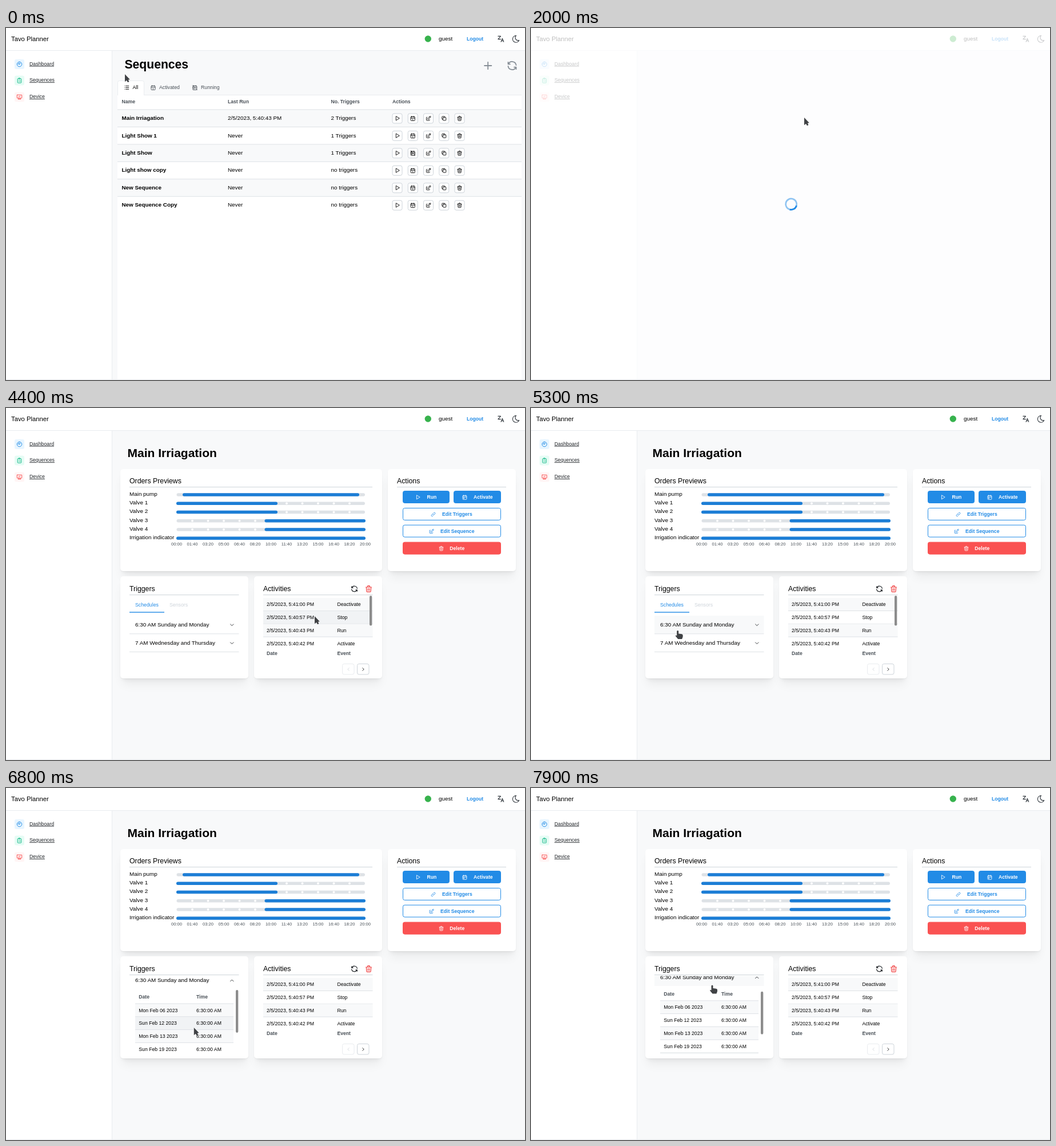
These frames come from a looping animation (908 px wide and 617 px high, 8000 ms). An HTML page:

```html
<!DOCTYPE html>
<html lang="en">
<head>
<meta charset="utf-8">
<title>Watering scheduler</title>
<style>
html, body { margin: 0; width: 100%; height: 100%; overflow: hidden; background: #fff; }
svg { display: block; width: 908px; height: 617px; font-family: "Liberation Sans", Arial, sans-serif; }
text { white-space: pre; }
.card { width: 100%; height: 100%; background: #fff; border-radius: 5px;
  box-shadow: 0 1px 2px rgba(0,0,0,.05), 0 14px 18px -4px rgba(0,0,0,.06), 0 7px 7px -4px rgba(0,0,0,.05); }
</style>
</head>
<body>
<svg id="stage" viewBox="0 0 908 617">
  <defs><clipPath id="scrollArea"><rect x="214" y="329.5" width="195" height="137"/></clipPath></defs>
  <g id="shell"></g>
  <g id="list"></g>
  <g id="detail"></g>
  <g id="activities"></g>
  <g id="triggers" clip-path="url(#scrollArea)"></g>
  <g id="loader"></g>
  <g id="cursor"></g>
</svg>
<script>
const LOOP = 8000, STEP = 100;
const BLUE = '#228be6', LINE = '#dee2e6', STRIPE = '#f8f9fa', HOVER = '#f1f3f5', GRAY = '#495057';
const CALENDAR = 'M6 5h12a2 2 0 0 1 2 2v12a2 2 0 0 1-2 2H6a2 2 0 0 1-2-2V7a2 2 0 0 1 2-2zM16 3v4M8 3v4M4 11h16';
const ICONS = {
  play: 'M7 4v16l13-8z',
  calendar: CALENDAR + 'M11 15h1v3',
  event: CALENDAR + 'M8 15h2v2H8z',
  calendarOff: CALENDAR + 'M3 3l18 18M8 15h2v2H8z',
  edit: 'M7 7H6a2 2 0 0 0-2 2v9a2 2 0 0 0 2 2h9a2 2 0 0 0 2-2v-1M20.4 6.6a2.1 2.1 0 0 0-3-3L9 12v3h3zM16 5l3 3',
  copy: 'M10 8h8a2 2 0 0 1 2 2v8a2 2 0 0 1-2 2h-8a2 2 0 0 1-2-2v-8a2 2 0 0 1 2-2zM16 8V6a2 2 0 0 0-2-2H6a2 2 0 0 0-2 2v8a2 2 0 0 0 2 2h2',
  trash: 'M4 7h16M10 11v6M14 11v6M5 7l1 12a2 2 0 0 0 2 2h8a2 2 0 0 0 2-2l1-12M9 7V4a1 1 0 0 1 1-1h4a1 1 0 0 1 1 1v3',
  list: 'M9 6h11M9 12h11M9 18h11M5 6v.01M5 12v.01M5 18v.01',
  refresh: 'M20 11A8.1 8.1 0 0 0 4.5 9M4 5v4h4M4 13a8.1 8.1 0 0 0 15.5 2M20 19v-4h-4',
  plus: 'M12 5v14M5 12h14',
  moon: 'M12 3h.4a7.5 7.5 0 0 0 7.9 12.4A9 9 0 1 1 12 3z',
  translate: 'M4 4h8l-8 9h8M13 21l4-10 4 10M14.5 18h5',
  link: 'M10 14a3.5 3.5 0 0 0 5 0l4-4a3.5 3.5 0 0 0-5-5l-.5.5M14 10a3.5 3.5 0 0 0-5 0l-4 4a3.5 3.5 0 0 0 5 5l.5-.5',
  chevron: 'M6 9l6 6 6-6',
  gauge: 'M12 3a9 9 0 1 1 0 18a9 9 0 1 1 0-18M11 12a1 1 0 1 0 2 0a1 1 0 1 0-2 0M13.4 10.6L16 8M7 12a5 5 0 0 1 5-5',
  clipboard: 'M9 5H7a2 2 0 0 0-2 2v12a2 2 0 0 0 2 2h10a2 2 0 0 0 2-2V7a2 2 0 0 0-2-2h-2M11 3h2a2 2 0 0 1 0 4h-2a2 2 0 0 1 0-4zM9 12h.01M13 12h2M9 16h.01M13 16h2',
  desktop: 'M4 4h16a1 1 0 0 1 1 1v10a1 1 0 0 1-1 1H4a1 1 0 0 1-1-1V5a1 1 0 0 1 1-1zM7 20h10M9 16v4M15 16v4M8 12l3-3 2 2 3-3'
};

const $ = id => document.getElementById(id);
const clamp01 = v => Math.min(1, Math.max(0, v));
const rect = (x, y, w, h, fill, extra = '') =>
  `<rect x="${x}" y="${y}" width="${w}" height="${h}" fill="${fill}" ${extra}/>`;
const box = (x, y, w, h, stroke, fill = '#fff') => rect(x, y, w, h, fill, `rx="3" stroke="${stroke}"`);
const hline = (x1, x2, y, color = LINE) => rect(x1, y - .5, x2 - x1, 1, color);
// y is the middle of the capital letters
const text = (x, y, str, size = 9.87, fill = '#000', extra = '') =>
  `<text x="${x}" y="${y + size * .36}" font-size="${size}" fill="${fill}" ${extra}>${str}</text>`;
const bold = (x, y, str, size = 8.65, fill = GRAY) => text(x, y, str, size, fill, 'font-weight="700"');
const icon = (name, x, y, scale = .47, color = '#000', angle = 0, width = 2) =>
  `<path d="${ICONS[name]}" transform="translate(${x} ${y}) rotate(${angle}) scale(${scale}) translate(-12 -12)"
    fill="none" stroke="${color}" stroke-width="${width}" stroke-linecap="round" stroke-linejoin="round"/>`;
const card = (x, y, w) =>
  `<foreignObject x="${x}" y="${y}" width="${w}" height="178.5" overflow="visible"><div class="card"></div></foreignObject>`;

function drawShell() {
  const link = (y, label, name, color, tint, underline) =>
    rect(15, y - 8, 17, 17, tint, 'rx="3"') + icon(name, 23.5, y + .5, .47, color) +
    text(41, y - .5, label, 8.8, '#212529', `style="text-decoration:underline ${underline}"`);
  return rect(0, 0, 908, 617, '#fff') + rect(185, 39, 723, 578, '#f8f9fa') +
    hline(0, 908, 39.5, '#e9ecef') + rect(185, 39, 1, 578, '#e9ecef') +
    text(9, 18.5, 'Tavo Planner', 11.28) +
    '<circle cx="738.3" cy="19" r="5.7" fill="#37b24d"/>' +
    text(757, 18.8, 'guest') + bold(806, 18.5, 'Logout', 8.65, BLUE) +
    icon('translate', 865.5, 19, .58, '#343a40') + icon('moon', 892.3, 19.3, .65, '#343a40', 0, 1.8) +
    link(63, 'Dashboard', 'gauge', BLUE, '#e7f5ff', '#000') +
    link(91.5, 'Sequences', 'clipboard', '#12b886', '#e6fcf5', '#551a8b') +
    link(120.5, 'Device', 'desktop', '#fa5252', '#fff5f5', '#551a8b');
}

function drawList() {
  const rows = [
    ['Main Irriagation', '2/5/2023, 5:40:43 PM', '2 Triggers'],
    ['Light Show 1', 'Never', '1 Triggers'],
    ['Light Show', 'Never', '1 Triggers'],
    ['Light show copy', 'Never', 'no triggers'],
    ['New Sequence', 'Never', 'no triggers'],
    ['New Sequence Copy', 'Never', 'no triggers']
  ];
  let out = bold(207.5, 63.5, 'Sequences', 21.15, '#000') +
    icon('plus', 843.2, 66, .88, '#868e96') + icon('refresh', 885.5, 66, .88, '#868e96') +
    rect(195, 117, 707, 500, '#fff') +
    '<path d="M195.5 118V95.5q0-3 3-3h40q3 0 3 3V118" fill="#fff" stroke="#e9ecef"/>' +
    hline(242, 902, 117.5, '#e9ecef') +
    icon('list', 211, 104.5) + text(221.5, 104, 'All', 8.75) +
    icon('calendar', 257.5, 104.5, .44, GRAY) + text(268, 104, 'Activated', 8.75, GRAY) +
    icon('calendarOff', 330.3, 104.5, .44, GRAY) + text(341, 104, 'Running', 8.75, GRAY) +
    bold(202.5, 128.5, 'Name') + bold(388, 128.5, 'Last Run') +
    bold(568.5, 128.5, 'No. Triggers') + bold(676, 128.5, 'Actions');
  rows.forEach(([name, last, triggers], i) => {
    const y = 157.5 + 30.45 * i, top = 143 + 30.45 * i;
    if (i % 2 === 0) out += rect(195, top, 707, 30.45, STRIPE);
    out += hline(195, 902, top) + bold(202.5, y, name, 9.87, '#000') +
      text(388, y, last) + text(568.5, y, triggers);
    ['play', i === 2 ? 'calendarOff' : 'calendar', 'edit', 'copy', 'trash'].forEach((name, k) => {
      const x = 684.5 + 27.25 * k;
      out += box(x - 8.5, y - 7.5, 17, 17, '#ced4da') + icon(name, x, y + 1, .44);
    });
  });
  return out;
}

function drawDetail() {
  const title = (x, y, str, right) => text(x, y, str, 12.3) + hline(x, right, y + 11.3, '#ced4da');
  const button = (x, y, w, label, labelX, name, iconX, fill, color = '#fff') =>
    box(x + .5, y + .5, w - 1, 21, color === '#fff' ? fill : color, fill) +
    icon(name, iconX, y + 11.5, .42, color) + bold(labelX, y + 10.7, label, 8.65, color);
  let out = bold(212.5, 78.5, 'Main Irriagation', 21, '#000') +
    card(200, 107, 458) + card(668, 107, 224) + card(200, 295, 224) + card(434, 295, 224) +
    title(216, 127.3, 'Orders Previews', 641) + title(684, 127.3, 'Actions', 875) +
    title(216, 316.3, 'Triggers', 407.5) + title(450, 316.3, 'Activities', 641.5);

  const tickX = i => 298.5 + 27.5 * i;
  [['Main pump', 309, 618], ['Valve 1', 298, 475], ['Valve 2', 298, 475],
   ['Valve 3', 452.5, 629], ['Valve 4', 452.5, 629], ['Irrigation indicator', 298, 629]
  ].forEach(([label, from, to], i) => {
    const y = 152 + 15.25 * i;
    out += text(216, y - 1.7, label) + rect(298.5, y - 2.7, 329.5, 5.4, LINE, 'rx="2.7"');
    for (let k = 1; k < 12; k++)
      if (i && (tickX(k) < from || tickX(k) > to))
        out += `<circle cx="${tickX(k)}" cy="${y}" r="1.9" fill="#fff"/>`;
    out += rect(from, y - 2.7, to - from, 5.4, '#1c7ed6', 'rx="2.7"');
  });
  for (let k = 0; k <= 12; k++) {
    const minutes = 100 * k, pad = n => String(n).padStart(2, '0');
    out += text(tickX(k), 238, pad(Math.floor(minutes / 60)) + ':' + pad(minutes % 60), 7.6, GRAY, 'text-anchor="middle"');
  }

  return out +
    button(694, 145, 82, 'Run', 736.5, 'play', 720.5, BLUE) +
    button(783, 145, 83, 'Activate', 818, 'event', 802.5, BLUE) +
    button(694, 175, 172, 'Edit Triggers', 763, 'link', 747.5, '#fff', BLUE) +
    button(694, 204.7, 172, 'Edit Sequence', 760, 'edit', 744.5, '#fff', BLUE) +
    button(694, 234.7, 172, 'Delete', 776.3, 'trash', 761.5, '#fa5252') +
    icon('refresh', 609.5, 317, .6, '#212529') + icon('trash', 634.5, 317, .6, '#f03e3e') +
    box(588.5, 448.5, 20.5, 18.5, '#e9ecef') + icon('chevron', 599, 458, .4, '#ced4da', 90) +
    box(614.5, 448.5, 20.5, 18.5, '#ced4da') + icon('chevron', 625, 458, .4, '#000', -90);
}

function drawActivities(t, mouse) {
  const rows = [['41:00', 'Deactivate'], ['40:57', 'Stop'], ['40:43', 'Run'], ['40:42', 'Activate']];
  let out = '';
  rows.forEach(([time, event], i) => {
    const y = 344 + 22.8 * i, height = i < 3 ? 22.8 : 17;
    const hovered = mouse.x > 450 && mouse.x < 641 && mouse.y >= y - 11.4 && mouse.y < y - 11.4 + height;
    if (hovered || i % 2 === 0) out += rect(450, y - 11, 191.5, height, hovered ? HOVER : STRIPE);
    if (i < 3) out += hline(450, 641.5, y + 11.5);
    out += text(456, y, `2/5/2023, 5:${time} PM`, 8.68) + text(579.5, y, event, 8.68);
  });
  out += bold(456, 430, 'Date') + bold(579.5, 430, 'Event');
  if (t >= 4000 && t < 5700) out += rect(636, 329, 4.3, 52.5, '#8c8c8c', 'rx="2.1"');
  return out;
}

const MAX_SCROLL = 107;
const scrollAt = t => MAX_SCROLL * clamp01((t - 6600) / 500) - 59 * clamp01((t - 7300) / 600);

function drawTriggers(t, mouse) {
  const open = t >= 6100, scroll = scrollAt(t);
  const over = (y, half) => mouse.x > 216 && mouse.x < 407 && mouse.y > 329 && mouse.y < 466 && Math.abs(mouse.y - y) <= half;
  const control = (y, label, angle) => {
    const hovered = over(y, 15.5);
    mouse.hand = mouse.hand || hovered;
    return (hovered ? rect(216, y - 15.2, 191.5, 31, STRIPE) : '') +
      text(226, y - .2, label) + icon('chevron', 395.3, y + 1, .45, '#212529', angle);
  };
  let out = text(226, 344.7 - scroll, 'Schedules', 8.78, BLUE) + text(286, 344.7 - scroll, 'Sensors', 8.78, '#ced4da') +
    rect(216, 357.3 - scroll, 61, 1.4, BLUE) +
    control(379.3 - scroll, '6:30 AM Sunday and Monday', t < 6100 ? 0 : t < 6200 ? 135 : 180);
  if (!open)
    return out + hline(216, 407.5, 395.8) + control(411.2, '7 AM Wednesday and Thursday', 0) + hline(216, 407.5, 427.5);

  out += bold(232.3, 409 - scroll, 'Date') + bold(333, 409 - scroll, 'Time');
  ['Mon Feb 06', 'Sun Feb 12', 'Mon Feb 13', 'Sun Feb 19', 'Mon Feb 20'].forEach((day, i) => {
    const y = 432.2 + 22.8 * i - scroll, hovered = over(y, 11.4);
    if (hovered || i % 2 === 0) out += rect(226, y - 11.4, 172, 22.8, hovered ? HOVER : STRIPE);
    out += hline(226, 398, y - 11.4) + text(232.3, y, day + ' 2023', 8.68) + text(333, y, '6:30:00 AM', 8.68);
  });
  if (t < 6200) return out + hline(216, 407.5, 466);
  return out + hline(216, 407.5, 545 - scroll) + control(560.4 - scroll, '7 AM Wednesday and Thursday', 0) +
    rect(402, 329.5 + 61 * scroll / MAX_SCROLL, 4.3, 75, '#8c8c8c', 'rx="2.1"');
}

function drawLoader(t) {
  if (t < 1700 || t >= 2500) return '';
  const strength = Math.min(1, (t - 1600) / 200, (2500 - t) / 200);
  const ring = `fill="none" stroke="${BLUE}" stroke-width="2.7"`;
  return rect(0, 0, 908, 617, '#fff', `opacity="${.75 * strength}"`) +
    `<g transform="translate(455.2 308.8) rotate(${105 + (t - 2000) * .36})" opacity="${strength}">
      <circle r="9.6" ${ring} stroke-opacity=".5"/><path d="M9.6 0A9.6 9.6 0 0 0 0-9.6" ${ring}/></g>`;
}

// time, x, y of the pointer tip
const MOUSE_PATH = [
  [0, 208, 81], [100, 217, 88], [300, 217, 88], [400, 208, 89], [900, 598, 165], [1200, 458, 153],
  [1400, 478, 157], [2800, 478, 157], [2900, 390, 180], [3300, 329, 235], [3700, 381, 307],
  [3800, 381, 307], [4400, 540, 365], [4600, 540, 365], [5200, 229, 390], [5500, 309, 390],
  [5800, 312, 377], [6100, 312, 377], [6500, 326, 430], [6600, 326, 430], [7100, 333, 405],
  [7300, 335, 401], [7900, 316, 345.5], [8000, 316, 345.5]
];

function mouseAt(t) {
  const i = Math.max(1, MOUSE_PATH.findIndex(p => p[0] >= t));
  const [t0, x0, y0] = MOUSE_PATH[i - 1], [t1, x1, y1] = MOUSE_PATH[i];
  const k = (t - t0) / (t1 - t0);
  return { x: x0 + (x1 - x0) * k, y: y0 + (y1 - y0) * k, hand: false };
}

const ARROW = 'M0 0V13.3L3 10.8 5 14.3 7.5 13 5.8 9.8 8.8 9.3z';
const HAND = 'M1 0Q2.5 0 2.5 1.5V5.5L8 6.3Q10 6.8 10 8.5V11L8.5 15H1.5L-3 9.5Q-2.7 7.7-.5 9V1.5Q-.5 0 1 0z';
const drawCursor = ({ x, y, hand }) =>
  `<path d="${hand ? HAND : ARROW}" transform="translate(${x} ${y})" fill="#404245" stroke="#fff" stroke-width=".8" stroke-opacity=".7" paint-order="stroke"/>`;

$('shell').innerHTML = drawShell();
$('list').innerHTML = drawList();
$('detail').innerHTML = drawDetail();
$('stage').insertAdjacentHTML('beforeend', hline(0, 908, 616.3, '#e9ecef'));

let shown = -1;
function render() {
  const t = Math.floor(performance.now() % LOOP / STEP) * STEP;
  if (t !== shown) {
    shown = t;
    const mouse = mouseAt(t), detail = t >= 2400;
    $('list').style.display = t < 1700 ? '' : 'none';
    $('detail').style.display = detail ? '' : 'none';
    $('activities').innerHTML = detail ? drawActivities(t, mouse) : '';
    $('triggers').innerHTML = detail ? drawTriggers(t, mouse) : '';
    $('loader').innerHTML = drawLoader(t);
    $('cursor').innerHTML = drawCursor(mouse);
  }
  requestAnimationFrame(render);
}
render();
</script>
</body>
</html>
```
